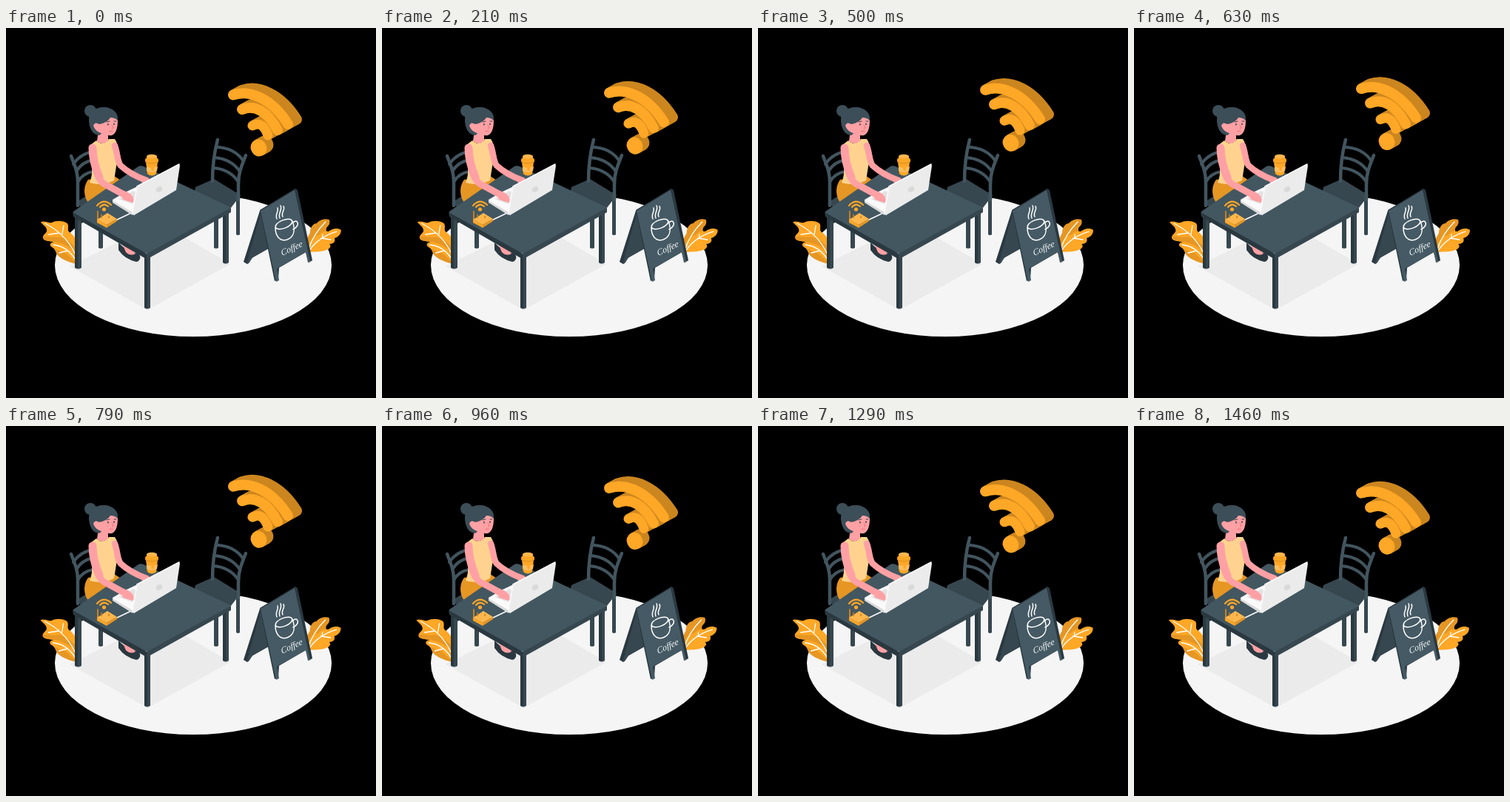
Animation of 500 by 500 pixels, one loop 1.5 s. Source, as an HTML page:

```html
<!DOCTYPE html>
<html lang="en">
<head>
<meta charset="utf-8">
<title>Cafe wifi</title>
<style>
  html, body { margin: 0; width: 100%; height: 100%; overflow: hidden; background: #000; }
  svg { display: block; width: 100%; height: 100%; }
  .line { fill: none; stroke-linecap: round; stroke-linejoin: round; }
  .white { stroke: #fff; }
  .amber { fill: #ffa726; }
  .ochre { fill: #e69623; }
  .slate { fill: #455a64; }
  .steel { fill: #37474f; }
  .dark { fill: #2a3840; }
  .hair { fill: #3c4e58; }
  .skin { fill: #ffa0a4; }
  .arm { stroke: #ffa0a4; }
  .frame { stroke: #42555f; }
</style>
</head>
<body>
<svg viewBox="0 0 500 500">
  <ellipse cx="253" cy="320.500" rx="187" ry="96.500" fill="#f5f5f5"/>
  <path d="M191 381L303 319L206 262L86 322Z" fill="#ebebeb"/>

  <g class="leaf">
    <path class="amber" d="M47 262C53 260 58 264 62 263C68 260 77 260 83 264C86 268 82 273 86 276C92 280 96 286 97 296L97 319C88 317 78 313 71 307C67 304 68 299 62 296C58 293 60 290 65 289C58 288 50 287 50 283C50 278 57 277 55 272C54 267 49 266 47 262Z"/>
    <path class="ochre" d="M50 283C55 280 64 284 72 282C82 285 91 291 97 301L97 306C88 296 76 290 65 289C58 288 50 288 50 283ZM62 296C68 301 76 301 83 306L97 319C86 317 76 313 70 307C67 304 68 299 62 296Z"/>
    <path class="line white" stroke-width="1.3" d="M53 264C68 272 83 283 94 306M76 279L78 267M72 277L58 279M64 293C77 294 88 302 96 316M83 301L72 304"/>
  </g>
  <g class="leaf">
    <path class="ochre" d="M437 259C430 257 423 260 420 264C415 264 411 270 411 277L405 288L407 303C415 296 423 290 430 282C436 277 431 273 434 269C438 266 438 262 437 259Z"/>
    <path class="amber" d="M453 273C447 269 440 272 436 275C431 273 425 277 423 280C417 279 412 286 409 293L408 303C417 302 426 303 433 300C439 298 440 294 437 292C443 292 446 288 444 284C450 282 453 278 453 273Z"/>
    <path class="line white" stroke-width="1.3" d="M432 262C422 272 413 286 409 299M447 275C433 279 418 288 410 301M426 284L439 286M428 283L428 279"/>
  </g>

  <!-- far chair -->
  <path class="steel" d="M281 240h6v57q-3 2-6 0ZM311 222h5v57q-2 2-5 0Z"/>
  <path class="steel" d="M256 215L281 204L317 226L304 243L290 240L254 225Z"/>
  <g class="line frame">
    <path stroke-width="4" d="M285 161Q309 162 321 180M281 175Q305 177 316 194M280 189Q303 191 314 208"/>
    <path stroke-width="4.500" d="M286 151C282 166 279 181 279 207M324 172C319 185 314 195 314 211V232"/>
  </g>

  <!-- near chair -->
  <path class="steel" d="M125 260h6v37q-3 2-6 0Z"/>
  <path class="steel" d="M94 236L115 223L150 240L120 256Z"/>
  <g class="line frame">
    <path stroke-width="4" d="M91 184Q100 170 118 167M95 194Q102 181 119 178M97 208Q104 196 118 194"/>
    <path stroke-width="4.500" d="M88 173C92 184 97 193 97 208V240"/>
  </g>

  <!-- seated woman -->
  <path class="dark" d="M152 290Q164 303 180 305Q184 314 176 316Q160 312 152 300Z"/>
  <path class="skin" d="M156 289L165 295L175 305Q168 309 162 303Z"/>
  <path d="M111 205C104 214 104 230 114 239L136 240L163 211L146 200Z" class="ochre"/>
  <path class="skin" d="M125 138L138 142L138 152Q132 160 123 153Z"/>
  <path d="M122 152Q132 161 139 150L147 150C154 160 152 175 149 187L146 206Q131 214 113 209C120 193 114 177 113 159Z" fill="#ffd38f"/>
  <circle class="hair" cx="114" cy="112" r="8"/>
  <path class="hair" d="M112 126C111 113 121 107 132 107C144 107 152 115 151 124L145 130L126 145C117 144 113 137 112 126Z"/>
  <path class="skin" d="M126 130C132 129 138 126 141 121Q147 121 151 125C151 134 149 143 143 145Q136 146 128 142Q120 139 118 132Q120 126 126 130Z"/>
  <g class="line" stroke="#37474f">
    <path d="M136 127l4-1M146 126l3 0"/>
    <path stroke-width="1.800" d="M138 130v.5M146 129.500v.5"/>
    <path stroke="#e8717a" d="M143 131l2.500 4l-2 .5M140 139.500l4-.5"/>
  </g>

  <!-- table -->
  <path class="steel" d="M93 252h9v72q-4 3-9 0ZM187 305h8v73q-4 3-8 0ZM293 247h8v70q-4 3-8 0Z"/>
  <path class="dark" d="M93 254h4v71l-4-1ZM187 307h4v72l-4-1ZM293 247h4v71l-4-1Z"/>
  <path d="M91 248L179 187Q183 185 188 188L303 242Q305 243 303 245L194 304Q190 306 186 303L92 251Q90 249 91 248Z" fill="#435761"/>
  <path class="dark" d="M90 249L187 303Q190 305 190 306V312L186 310L91 255Z"/>
  <path class="steel" d="M190 305L304 243V249L193 311L190 312Z"/>

  <!-- takeaway cup -->
  <path class="amber" d="M189 181L191 197Q197 202 203 197L205 181Z"/>
  <path d="M190 187Q197 191 205 187L204 193Q197 197 190 193Z" fill="#ffbd5f"/>
  <circle class="amber" cx="198" cy="191" r="2"/>
  <path class="ochre" d="M188 178V181Q197 187 206 181V178Z"/>
  <ellipse class="amber" cx="197" cy="178" rx="9" ry="4"/>
  <path class="amber" d="M190 173V178Q197 181 204 178V173Z"/>
  <ellipse cx="197" cy="173.500" rx="7" ry="2.800" fill="#ffb74d"/>

  <!-- router -->
  <path class="line white" stroke-width="1.400" d="M148 260L169 250"/>
  <path class="line" stroke="#c9801c" stroke-width="2" d="M124 248V261"/>
  <path d="M123 259L137 250L150 258L136 266Z" fill="#ffb74d"/>
  <path class="amber" d="M123 259L136 266V270L123 263Z"/>
  <path class="ochre" d="M136 266L150 258V261L136 270Z"/>
  <path d="M129 257v-5M139 254v3" stroke="#c9801c" stroke-width="1.500"/>
  <circle class="amber" cx="132.500" cy="245" r="2.600"/>
  <path class="line" stroke="#ffa726" stroke-width="2.200" d="M123 240Q132 230 142 239M127 242Q132 236 138 241"/>

  <!-- laptop and arms -->
  <path class="line arm" stroke-width="8.500" d="M147 159C151 170 150 180 155 186Q168 198 190 206"/>
  <path d="M144 232L161 222L180 213L188 226L171 252L144 235Z" fill="#fafafa"/>
  <path d="M144 233L171 249V253L144 236Z" fill="#dcdcdc"/>
  <path d="M152 231L172 220L178 223L171 238Z" fill="#e2e2e2"/>
  <path class="line arm" stroke-width="11" d="M117 162C117 178 121 190 126 202"/>
  <path class="line arm" stroke-width="9" d="M126 202Q128 210 139 214L161 226"/>
  <path class="skin" d="M155 219Q166 221 171 227Q174 234 171 236L158 232ZM181 201Q192 202 197 207L185 212Z"/>
  <path d="M177 214L233 184Q235 184 235 186L230 219L173 253Q170 252 171 249Z" fill="#ebebeb"/>
  <path class="line" stroke="#fafafa" stroke-width="1.500" d="M171 250L177 214L234 184"/>
  <ellipse cx="207" cy="218" rx="4.500" ry="3.500" fill="#d9d9d9" transform="rotate(-28 207 218)"/>

  <!-- chalkboard -->
  <path class="dark" d="M343 247L321 316L326 319L332 311L355 298L362 255Z"/>
  <path class="steel" d="M345 248L325 319L328 318L334 309L355 297L360 260Z"/>
  <path class="dark" d="M343 246L391 217L394 219L414 314L409 317L405 303L369 324L368 340L363 342Z"/>
  <path class="slate" d="M344 247L390 219L411 316L408 317L405 303L366 325L369 341L365 343Z"/>
  <g class="line white" stroke-width="1.500">
    <path d="M366 258C363 252 369 248 367 243M370 257C367 250 374 246 371 240M374 255C371 249 378 246 375 241"/>
    <ellipse cx="375.500" cy="265" rx="12" ry="5.500" transform="rotate(-22 375.500 265)"/>
    <path d="M364 270C364 281 370 289 380 286C390 282 391 272 387 261M388 263C393 258 396 264 393 268Q391 271 388 272"/>
  </g>
  <text transform="translate(373 308) rotate(-25) skewX(-8)" fill="#fff" font-family="'Liberation Serif', serif" font-style="italic" font-size="12">Coffee</text>

  <g id="wifi"></g>
</svg>
<script>
  const wifi = document.getElementById('wifi');
  const leaves = document.querySelectorAll('.leaf');

  // Bars share one front plane and are extruded up and to the right behind it.
  const bars = [
    { path: 'M307 90.5C329 83 359 95 381 130', width: 14, depth: 12 },
    { path: 'M319 110C336 103 354 113 367 138', width: 14, depth: 12 },
    { path: 'M333 132C343 127 349 132 354 145', width: 13, depth: 12 },
    { path: 'M341 161L342 163', width: 21, depth: 9 },
  ];
  const stroke = (bar, offset, color) =>
    `<path class="line" d="${bar.path}" stroke="${color}" stroke-width="${bar.width}" transform="translate(${offset} ${-0.55 * offset})"/>`;
  let shape = '';
  for (const bar of bars) {
    for (let i = bar.depth; i > 0; i--) shape += stroke(bar, i, '#cc861f');
  }
  for (const bar of bars) shape += stroke(bar, 0, '#ffa726');
  wifi.innerHTML = shape;

  const PERIOD = 1500;
  const shake = [0, -1, 2, -4, 4, -4, 4, -4, 2, -1, 0];

  function draw(now) {
    const phase = ((now + 25) % PERIOD) / PERIOD;
    const rise = 10 * (1 - Math.abs(2 * phase - 1));
    wifi.setAttribute('transform', `translate(0 ${0.3 - rise})`);

    const step = Math.floor(phase * 10);
    const sway = shake[step] + (shake[step + 1] - shake[step]) * (phase * 10 - step);
    leaves.forEach(leaf => leaf.setAttribute('transform', `translate(${sway} 0)`));
    requestAnimationFrame(() => draw(performance.now()));
  }
  draw(0);
</script>
</body>
</html>
```
